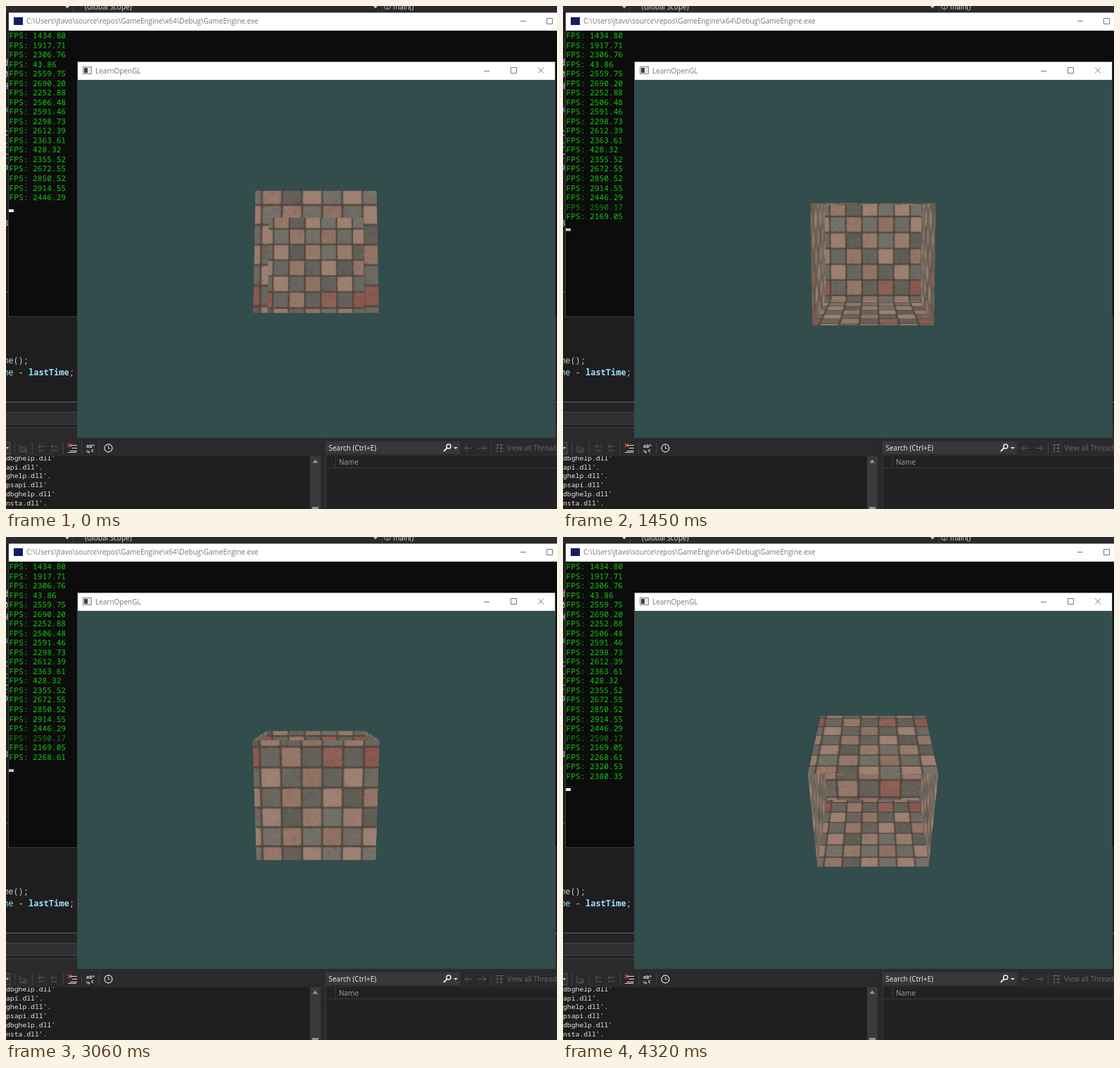
Write an HTML page with a canvas that moves like this. It is 783 by 715 pixels and loops after 4390 ms.

```html
<!DOCTYPE html>
<html lang="en">
<head>
<meta charset="utf-8">
<title>Rotating cube</title>
<style>
html, body { margin: 0; width: 100%; height: 100%; overflow: hidden; background: #1e1e1e; }
svg, pre, canvas, #cursor { position: absolute; }
svg { left: 0; top: 0; font: 10px "Open Sans", sans-serif; }
.mono { font-family: "Noto Sans Mono", monospace; }
.code { font-size: 12px; }
.out { font-size: 9.75px; font-weight: 500; fill: #e6e6e6; }
pre { left: 4.5px; top: 35px; margin: 0; color: #10c80c; font: 500 11.2px/13.53px "Noto Sans Mono", monospace; }
pre .dim { color: #0f900d; }
#cursor { left: 4px; width: 7px; height: 4px; }
canvas { left: 364.3px; top: 282.3px; width: 153.45px; height: 153.45px; }
</style>
</head>
<body>
<svg width="783" height="715" viewBox="0 0 783 715">
  <!-- editor -->
  <rect width="783" height="715" fill="#1e1e1e"/>
  <rect width="783" height="9" fill="#2a2a2d"/>
  <path d="M95.5 0V9M534.5 0V9" stroke="#434346"/>
  <path d="M84 0h6l-3 3.500zM522 0h6l-3 3.500z" fill="#ccc"/>
  <path d="M538 0v3l4 2 4-2V0M542 0v5" fill="none" stroke="#aaa"/>
  <g fill="#e0e0e0">
    <text x="112" y="4.500">(Global Scope)</text>
    <text x="550" y="4.500">main()</text>
  </g>
  <g class="mono code" fill="#c8c8c8">
    <text x="-4" y="85">d</text><text x="-4" y="101">0</text><text x="-4" y="118">H</text>
    <text x="-4" y="151" fill="#569cd6">a</text><text x="-4" y="184">t</text>
    <text x="-4" y="201" fill="#4ec9b0">c</text><text x="-4" y="217">r</text>
    <text x="-4" y="233" fill="#9cdcfe">b</text><text x="-4" y="313">B</text>
    <text x="-4" y="508">me();</text>
    <text x="-4" y="525" fill="#9cdcfe">me <tspan fill="#c8c8c8">-</tspan> <tspan font-weight="bold">lastTime</tspan><tspan fill="#c8c8c8">;</tspan></text>
  </g>
  <path d="M0 406.500H4" stroke="#555"/>
  <rect y="562" width="783" height="2" fill="#46464a"/>
  <rect y="564" width="783" height="36" fill="#242426"/>
  <rect x="-1" y="577.500" width="110" height="17" fill="#303032" stroke="#464649"/>
  <rect y="600" width="783" height="115" fill="#2a2a2d"/>
  <path d="M0 599.500H783" stroke="#3f3f46"/>

  <!-- output panel -->
  <rect y="640" width="432" height="75" fill="#1e1e1e"/>
  <rect x="432" y="640" width="15" height="75" fill="#3a3a3d"/>
  <path d="M435.500 649.500h8l-4-5zM435 712h9v3h-9z" fill="#929295"/>
  <rect x="-1" y="620.500" width="7" height="16" fill="#333337" stroke="#555"/>
  <path d="M0 627h4l-2 3z" fill="#ccc"/>
  <path d="M12.500 620v17M37.500 620v17M81.500 620v17M107.500 620v17M132.500 620v17" stroke="#434346"/>
  <g fill="none" stroke="#5a5a5d">
    <path d="M20 624v10h10M22 628h6v4h-6M30 630l-3 3M46 626h9M46 632h9M49 623l-3 3 3 3M64 626h9M64 632h9M67 623l-3 3 3 3"/>
    <path d="M90 624.500h11M94 628.500h7M91 632.500h10M88 634.500h12" stroke="#ddd"/>
    <path d="M88 622l5 5m0-5l-5 5" stroke="#e05045" stroke-width="1.300"/>
    <path d="M115 631v3h4m-2-2l2 2-2 2M125 626v-2h-3" stroke="#ccc"/>
    <circle cx="145.500" cy="628.500" r="5.500" stroke="#d0d0d0" stroke-width="1.300"/>
    <path d="M145.500 625v4h3" stroke="#d0d0d0"/>
  </g>
  <text x="114" y="628" font-size="7" font-weight="bold" fill="#ddd">ab</text>
  <text x="121" y="634" font-size="7" font-weight="bold" fill="#ddd">c</text>
  <clipPath id="outClip"><rect y="640" width="432" height="75"/></clipPath>
  <g class="mono out" clip-path="url(#outClip)">
    <text y="646">dbghelp.dll'</text><text y="658.500">api.dll'.</text>
    <text y="671">ghelp.dll'.</text><text y="684">psapi.dll'</text>
    <text y="696.500">dbghelp.dll'</text><text y="709.500">nsta.dll'.</text>
  </g>

  <!-- call stack panel -->
  <rect x="447" y="614" width="7" height="101" fill="#29292b"/>
  <rect x="454" y="640" width="329" height="75" fill="#222224"/>
  <path d="M454.500 615V715M468.500 640V656M454 656.500H783" stroke="#3a3a3d"/>
  <rect x="455" y="619" width="190" height="18" fill="#38383b"/>
  <text x="458.500" y="632" fill="#f0f0f0">Search (Ctrl+E)</text>
  <circle cx="629" cy="626" r="3" fill="none" stroke="#eee" stroke-width="1.500"/>
  <path d="M627 628l-5 5" stroke="#eee" stroke-width="2"/>
  <path d="M636 627h6l-3 3z" fill="#ddd"/>
  <path d="M662 628.500h-10m4-4l-4 4 4 4M671 628.500h11m-4-4l4 4-4 4M696 623.500h11M696 628.500h3M701 628.500h6M696 633.500h3M701 633.500h6M698.500 623v11M703.500 623v11" fill="none" stroke="#606063"/>
  <path d="M689.500 620v17" stroke="#434346"/>
  <text x="712" y="632" fill="#69696c">View all Threads</text>
  <text x="473" y="651.500" fill="#a0a0a0">Name</text>

  <!-- console window -->
  <rect x="3.500" y="9.500" width="790" height="432" fill="#0c0c0c" stroke="#3c3c3c"/>
  <rect x="4" y="9.500" width="779" height="25.500" fill="#fff"/>
  <rect x="11" y="16" width="13" height="11" fill="#141d64"/>
  <text x="29" y="25" fill="#777">C:\Users\jtavo\source\repos\GameEngine\x64\Debug\GameEngine.exe</text>
  <path d="M731 21.500h8M768.500 17.500h8v8h-8z" fill="none" stroke="#777"/>

  <!-- render window -->
  <rect x="101.500" y="79.500" width="679" height="534" fill="#334c4c" stroke="#3a4444"/>
  <rect x="102" y="79.500" width="678" height="25.500" fill="#fff"/>
  <rect x="109.500" y="86.500" width="12" height="10" fill="#e8e8e8" stroke="#888"/>
  <rect x="111" y="88" width="5" height="7" fill="#345"/>
  <text x="127" y="95.500" fill="#777">LearnOpenGL</text>
  <path d="M679 92.500h8M717.500 87.500h8v8h-8zM756 87.500l8 8m0-8l-8 8" fill="none" stroke="#777"/>
</svg>
<pre id="log"></pre>
<div id="cursor"></div>
<script>
const LOOP = 4390, SIZE = 153.45, FOCAL = SIZE * 4, N = 176;
const log = document.getElementById('log'), cursor = document.getElementById('cursor');

const oldRates = [1434.80, 1917.71, 2306.76, 43.86, 2559.75, 2690.20, 2252.88, 2506.48, 2591.46,
  2298.73, 2612.39, 2363.61, 428.32, 2355.52, 2672.55, 2850.52, 2914.55, 2446.29];
const newRates = [2590.17, 2169.05, 2268.61, 2320.53, 2380.35];
const fpsLine = rate => `FPS: ${rate.toFixed(2)}\n`;

let seed = 11;
const rnd = () => (seed = (seed * 16807) % 2147483647) / 2147483647;

function newCanvas() {
  const canvas = document.createElement('canvas');
  canvas.width = canvas.height = N;
  return canvas;
}

// Checkered paving stones with soft stains and grit
function paving() {
  const canvas = newCanvas(), g = canvas.getContext('2d'), step = N * .166;
  g.fillStyle = '#564d45';
  g.fillRect(0, 0, N, N);
  for (let row = 0; row < 7; row++) for (let col = 0; col < 7; col++) {
    const x = N * .053 + (col - 1) * step, y = N * .05 + (row - 1) * step;
    const gray = (row + col) % 2 === 0;
    const red = row === 1 && col !== 2 && !gray;
    const base = gray ? [106, 103, 95] : red ? [138, 91, 81] : [152, 123, 109];
    const shift = (rnd() - .5) * 20;
    g.fillStyle = `rgb(${base.map(v => v + shift)})`;
    g.beginPath();
    g.roundRect(x + .8, y + .8, step - 1.6, step - 1.6, 3);
    g.fill();
    g.strokeStyle = 'rgba(60,51,44,.3)';
    g.lineWidth = 2;
    g.stroke();
  }
  for (let i = 0; i < 2500; i++) {
    const tone = rnd() < .5 ? '40,34,28' : '195,180,165';
    const size = 1 + rnd() * 4;
    g.fillStyle = `rgba(${tone},${rnd() * .2 / size})`;
    g.fillRect(rnd() * N, rnd() * N, size, size);
  }
  return canvas;
}

// Drawn without a depth test: later faces always cover earlier ones
const near = `translateZ(${SIZE / 2}px)`, far = `translateZ(${-SIZE / 2}px)`;
const flat = 'rotateX(90deg) ', side = 'rotateZ(-90deg) ' + flat;
const stone = paving();
const faces = [far, near, side + near, side + far, flat + far, flat + near].map(pose => {
  const canvas = newCanvas(), g = canvas.getContext('2d');
  g.drawImage(stone, 0, 0);
  // Side faces are only seen at a grazing angle, where detail melts away
  if (pose.startsWith(side)) {
    g.filter = 'blur(4px)';
    g.drawImage(stone, 0, 0);
  }
  document.body.append(canvas);
  return { canvas, pose };
});

let shown = -1;
function showLog(count) {
  if (count === shown) return;
  shown = count;
  const [first, ...rest] = newRates.slice(0, count).map(fpsLine);
  log.innerHTML = oldRates.map(fpsLine).join('') +
    (first ? `<span class="dim">${first}</span>` : '') + rest.join('');
  cursor.style.top = 289 + count * 13.53 + 'px';
  cursor.style.background = count % 5 ? '#c4bcae' : '#f2f2f2';
}

function draw(now) {
  const t = now % LOOP;
  const time = t < 330 ? Math.floor(t / 70) * 70 : Math.floor((t + 20) / 70) * 70 - 20;
  const angle = 97.4 + time * .0525;
  for (const { canvas, pose } of faces)
    canvas.style.transform = `perspective(${FOCAL}px) rotateX(${angle}deg) ${pose}`;
  showLog(Math.floor((time - 70) / 1020) + 1);
}

function tick() {
  draw(performance.now());
  requestAnimationFrame(tick);
}
tick();
</script>
</body>
</html>
```
